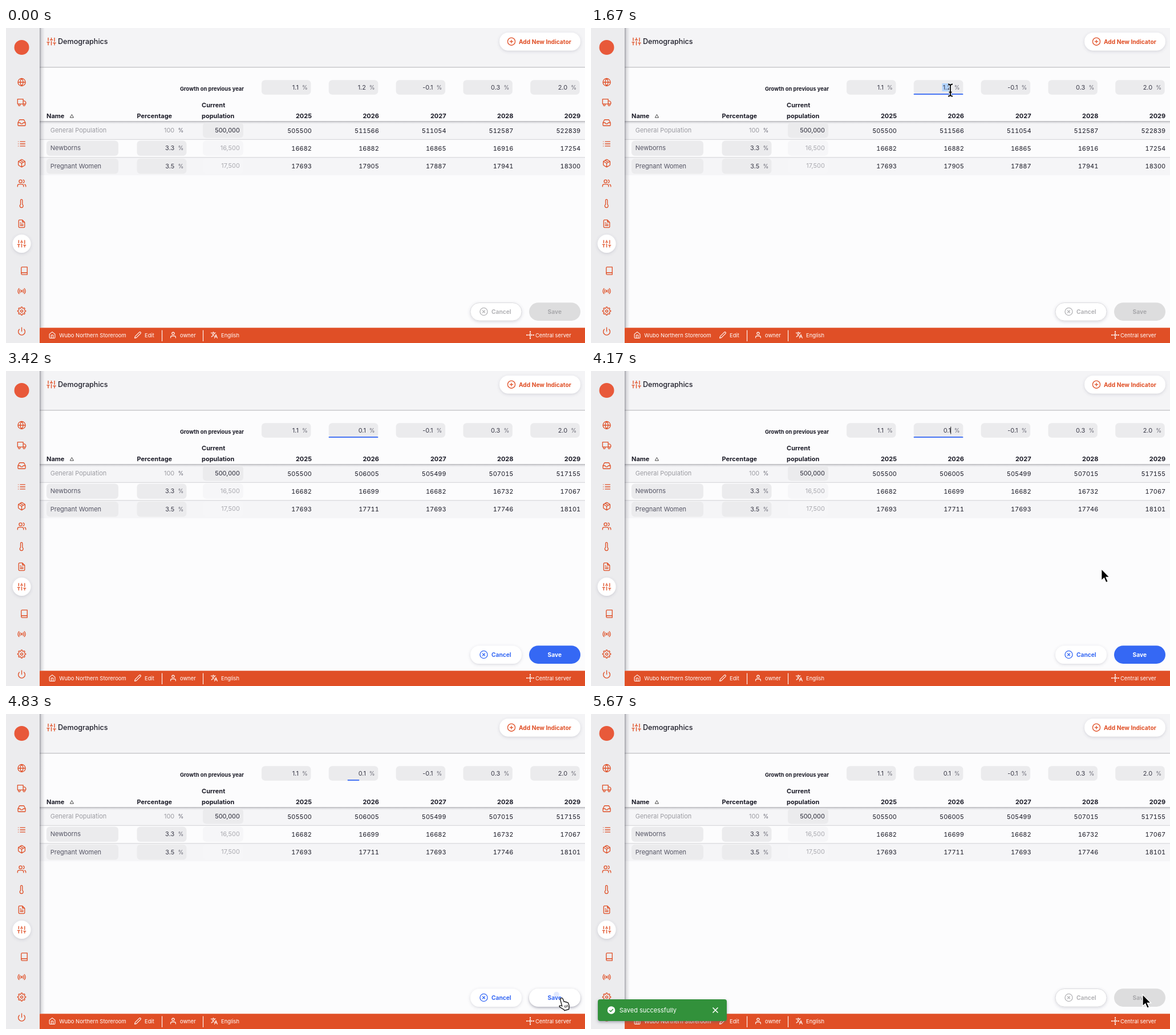
Write an HTML page that moves like this. It is 1015x552 px and loops after 5750 ms.

```html
<!DOCTYPE html>
<html lang="en">
<head>
<meta charset="utf-8">
<title>Demographics</title>
<style>
html, body { margin: 0; width: 100%; height: 100%; overflow: hidden; background: #fcfcfd; }
svg { display: block; width: 1015px; height: 552px; font-family: Inter, sans-serif; font-size: 11px; }
.b { font-weight: 700; }
.tab { font-variant-numeric: tabular-nums; }
</style>
</head>
<body>
<svg id="stage" viewBox="0 0 1015 552" xmlns="http://www.w3.org/2000/svg"></svg>
<script>
const LOOP = 5750;
const ORANGE = '#e04f26', BOX = '#ebebed', INK = '#1c1c28';
const YEARS = [2025, 2026, 2027, 2028, 2029];
const GROWTH = [1.1, 1.2, -0.1, 0.3, 2];
const STEP = 117.8;

// ---- markup helpers
const ring = (x, y, r) => `M${x - r} ${y}a${r} ${r} 0 1 0 ${2 * r} 0a${r} ${r} 0 1 0 ${-2 * r} 0`;
const rect = (x, y, w, h, fill, r = 0, extra = '') =>
  `<rect x="${x}" y="${y}" width="${w}" height="${h}" rx="${r}" fill="${fill}" ${extra}/>`;
const text = (x, y, s, o = {}) =>
  `<text x="${x}" y="${y}" fill="${o.fill || INK}" font-size="${o.size || 11}" font-weight="${o.weight || 400}"
    text-anchor="${o.end ? 'end' : o.mid ? 'middle' : 'start'}" ${o.attr || ''}>${s}</text>`;
const icon = (name, x, y, o = {}) => {
  const k = (o.size || 15.7) / 24;
  return `<path d="${ICONS[name]}" transform="translate(${x} ${y}) scale(${k}) translate(-12 -12)" fill="none"
    stroke="${o.color || ORANGE}" stroke-width="2" stroke-linecap="round" stroke-linejoin="round" ${o.attr || ''}/>`;
};

function gear() {
  let d = ring(12, 12, 3);
  for (let i = 0; i <= 96; i++) {
    const a = i / 96 * Math.PI * 2;
    const r = 9.4 + 1.6 * Math.tanh(2 * Math.cos(8 * a));
    d += (i ? 'L' : 'M') + (12 + r * Math.cos(a)).toFixed(2) + ' ' + (12 + r * Math.sin(a)).toFixed(2);
  }
  return d + 'z';
}

const ICONS = {
  globe: ring(12, 12, 10) + 'M2 12h20M12 2a15.3 15.3 0 0 1 4 10 15.3 15.3 0 0 1-4 10 15.3 15.3 0 0 1-4-10 15.3 15.3 0 0 1 4-10z',
  truck: 'M1 3h15v13H1zM16 8h4l3 3v5h-7z' + ring(5.5, 18.5, 2.5) + ring(18.5, 18.5, 2.5),
  inbox: 'M22 12h-6l-2 3h-4l-2-3H2M5.45 5.11L2 12v6a2 2 0 0 0 2 2h16a2 2 0 0 0 2-2v-6l-3.45-6.89A2 2 0 0 0 16.76 4H7.24a2 2 0 0 0-1.79 1.11z',
  list: 'M8 6h13M8 12h13M8 18h13M3 6h.01M3 12h.01M3 18h.01',
  box: 'M16.5 9.4l-9-5.19M21 16V8a2 2 0 0 0-1-1.73l-7-4a2 2 0 0 0-2 0l-7 4A2 2 0 0 0 3 8v8a2 2 0 0 0 1 1.73l7 4a2 2 0 0 0 2 0l7-4A2 2 0 0 0 21 16zM3.27 6.96L12 12.01l8.73-5.05M12 22.08V12',
  users: 'M17 21v-2a4 4 0 0 0-4-4H5a4 4 0 0 0-4 4v2M23 21v-2a4 4 0 0 0-3-3.87M16 3.13a4 4 0 0 1 0 7.75' + ring(9, 7, 4),
  thermo: 'M14 14.76V3.5a2.5 2.5 0 0 0-5 0v11.26a4.5 4.5 0 1 0 5 0z',
  file: 'M14 2H6a2 2 0 0 0-2 2v16a2 2 0 0 0 2 2h12a2 2 0 0 0 2-2V8zM14 2v6h6M16 13H8M16 17H8M10 9H8',
  sliders: 'M4 21v-7M4 10V3M12 21v-9M12 8V3M20 21v-5M20 12V3M1 14h6M9 8h6M17 16h6',
  book: 'M4 19.5A2.5 2.5 0 0 1 6.5 17H20M6.5 2H20v20H6.5A2.5 2.5 0 0 1 4 19.5v-15A2.5 2.5 0 0 1 6.5 2z',
  radio: ring(12, 12, 2) + 'M16.24 7.76a6 6 0 0 1 0 8.49m-8.48-.01a6 6 0 0 1 0-8.49m11.31-2.82a10 10 0 0 1 0 14.14m-14.14 0a10 10 0 0 1 0-14.14',
  gear: gear(),
  power: 'M18.36 6.64a9 9 0 1 1-12.73 0M12 2v10',
  plus: ring(12, 12, 10) + 'M12 8v8M8 12h8',
  cross: ring(12, 12, 10) + 'M15 9l-6 6M9 9l6 6',
  home: 'M3 9l9-7 9 7v11a2 2 0 0 1-2 2H5a2 2 0 0 1-2-2zM9 22V12h6v10',
  pen: 'M17 3a2.83 2.83 0 1 1 4 4L7.5 20.5 2 22l1.5-5.5z',
  user: 'M20 21v-2a4 4 0 0 0-4-4H8a4 4 0 0 0-4 4v2' + ring(12, 7, 4),
  hub: 'M12 8.5L15.5 12 12 15.5 8.5 12zM12 7V4M12 17v3M7 12H4M17 12h3' +
    ring(12, 1.5, 1) + ring(12, 22.5, 1) + ring(1.5, 12, 1) + ring(22.5, 12, 1),
  lang: 'M1.5 5h15M9 2v3M13 5c-1 4-4.500 9-10 13M5.500 8c1.500 3.500 4 6 7 8M13 22l4.500-11.500L22 22M14.800 18h5.500',
};

// ---- static layers
function defs() {
  const shadow = (id, dy, blur, op) => `<filter id="${id}" x="-30%" y="-60%" width="160%" height="240%">
    <feDropShadow dx="0" dy="${dy}" stdDeviation="${blur}" flood-color="#555770" flood-opacity="${op}"/></filter>`;
  return `<defs>${shadow('soft', 1.5, 2.5, .22)}${shadow('deep', 2, 2.5, .5)}
    <linearGradient id="edge"><stop offset="0" stop-color="#444450" stop-opacity=".5"/>
      <stop offset=".35" stop-color="#555560" stop-opacity=".17"/><stop offset="1" stop-color="#555560" stop-opacity="0"/></linearGradient>
    <linearGradient id="fall" x2="0" y2="1"><stop stop-color="#555560" stop-opacity=".22"/>
      <stop offset="1" stop-color="#555560" stop-opacity="0"/></linearGradient>
    <clipPath id="saveClip"><rect x="917" y="481" width="90" height="32" rx="16"/></clipPath></defs>`;
}

function sidebar() {
  const items = [['globe', 95], ['truck', 130.500], ['inbox', 166], ['list', 203], ['box', 237], ['users', 272],
    ['thermo', 307.500], ['file', 343], ['sliders', 378], ['book', 425.500], ['radio', 461], ['gear', 496], ['power', 531.500]];
  return rect(0, 0, 59, 552, '#ececee') + rect(59, 0, 9, 525, 'url(#edge)') +
    `<circle cx="27.500" cy="34" r="13" fill="#e8593a"/>
     <circle cx="27.500" cy="378" r="16" fill="#fff" filter="url(#soft)"/>` +
    items.map(([n, y]) => icon(n, n === 'book' ? 32 : 27.5, y)).join('');
}

function header() {
  return rect(59, 0, 956, 69, '#f4f4f6') + rect(59, 68.3, 956, 1.1, '#b9b9bc') +
    icon('sliders', 79.5, 23.5, { size: 16.5 }) + text(91, 27.7, 'Demographics', { size: 12.6, weight: 500 }) +
    rect(865, 8, 142, 31.5, '#fff', 15.75, 'filter="url(#soft)"') + icon('plus', 886, 23.7) +
    text(899, 27.5, 'Add New Indicator', { size: 10.2, weight: 700, fill: ORANGE });
}

function table() {
  const bold = { weight: 700 }, grey = '#9c9ca2', slate = '#555564';
  let s = rect(59, 164, 956, 31, '#f5f5f7') + rect(59, 227, 956, 31, '#f5f5f7') +
    rect(59, 194.8, 956, 1, '#d2d2d5') + rect(59, 226.3, 956, 1, '#d2d2d5') +
    rect(59, 163, 956, 1.2, '#bdbdc0') + rect(59, 164, 956, 4, 'url(#fall)');
  s += text(305, 110, 'Growth on previous year', { size: 9.4, weight: 700 }) +
    text(71, 158, 'Name', bold) + text(229.5, 158, 'Percentage', bold) +
    text(343, 139, 'Current', bold) + text(343, 158, 'population', bold) +
    '<path d="M112.300 157h6.200l-3.100-5.500z" fill="none" stroke="#333" stroke-width=".9"/>';
  YEARS.forEach((y, i) => {
    const x = i * STEP;
    s += text(536 + x, 158, y, { weight: 700, end: 1 }) + rect(448 + x, 91.3, 86.500, 25.400, BOX, 6) +
      text(519 + x, 107.500, '%', { size: 10, fill: '#666672' });
    if (i !== 1) s += text(513 + x, 107.800, GROWTH[i].toFixed(1), { end: 1, fill: '#3a3a48' });
  });
  [['General Population', '100', '500,000'], ['Newborns', '3.3', '16,500'], ['Pregnant Women', '3.5', '17,500']]
    .forEach(([name, pct, pop], i) => {
      const y = i * 31.4, top = i === 0;
      if (!top) s += rect(71, 166 + y, 126, 26.6, BOX, 6) + rect(229.5, 166 + y, 87, 26.6, BOX, 6);
      s += rect(345, 165.8 + y, 71, 26.6, top ? BOX : '#f6f6f8', 6) +
        text(77.7, 182.8 + y, name, { fill: top ? grey : slate }) +
        text(295.3, 182.8 + y, pct, { end: 1, fill: top ? grey : '#3a3a48' }) +
        text(301.5, 183 + y, '%', { size: 10, fill: '#666672' }) +
        text(410, 182.6 + y, pop, { end: 1, fill: top ? '#2b2b38' : '#aaaab0' });
      YEARS.forEach((_, c) => {
        s += text(536 + c * STEP, 183.6 + y, '', { end: 1, attr: `class="tab" id="v${i}${c}"` });
      });
    });
  return s;
}

function footer() {
  const o = { size: 9.4, fill: '#fff' }, w = { size: 13, color: '#fff' };
  return rect(59, 525.3, 956, 27, ORANGE) +
    icon('home', 81, 538, w) + text(93.3, 542.4, 'Wubo Northern Storeroom', o) +
    icon('pen', 231, 538, w) + text(243, 542.4, 'Edit', o) +
    rect(273, 529.5, 1.1, 19.5, '#fff') + icon('user', 293, 538, w) + text(305, 542.4, 'owner', o) +
    rect(345, 529.5, 1.1, 19.5, '#fff') + icon('lang', 365, 538, w) + text(377, 542.4, 'English', o) +
    icon('hub', 919, 538, { size: 13.5, color: '#fff' }) + text(928, 542.4, 'Central server', o);
}

function field() {
  return '<rect id="sel" x="615.500" y="97" width="16" height="14" fill="#b3d4fd"/>' +
    text(631, 107.800, '', { end: 1, fill: '#3a3a48', attr: 'id="typed"' }) +
    rect(630.2, 97.5, 1, 13, '#222', 0, 'id="caret"') +
    rect(565.8, 115.4, 86.5, 1.2, '#55555f', 0, 'id="hover"') +
    '<rect id="focus" y="115" height="1.800" fill="#3568f4"/>';
}

function buttons() {
  const o = { size: 10.2, weight: 700 };
  return rect(814, 481.5, 90, 31.5, '#fff', 15.75, 'id="cancelBox" filter="url(#soft)"') +
    `<g id="cancelInk">${icon('cross', 837.5, 497, { color: 'inherit' })}` +
    text(851, 500.800, 'Cancel', { ...o, fill: 'inherit' }) + '</g>' +
    rect(917, 481.3, 90, 31.7, '#ddd', 15.85, 'id="saveBox"') +
    '<circle id="ripple" cx="965" cy="491.500" fill="#3568f4" clip-path="url(#saveClip)"/>' +
    text(961.8, 500.800, 'Save', { ...o, mid: 1, attr: 'id="saveInk"' });
}

function toast() {
  return `<g id="toast">${rect(0, 500, 226, 38, '#33913b', 4, 'filter="url(#deep)"')}
    <circle cx="23.500" cy="519" r="6.800" fill="#fff"/>
    <path d="M20.300 519.200l2.300 2.300 4.200-4.400" fill="none" stroke="#33913b" stroke-width="1.500"/>
    ${text(37.7, 523, 'Saved successfully', { fill: '#fff' })}
    <path d="M201.500 514.500l9 9m0-9l-9 9" stroke="#fff" stroke-width="1.600"/></g>`;
}

function cursors() {
  return `<path id="arrow" d="M0 0V20.500L4.700 16.200 8 23.800 11.500 22.300 8.200 14.800H14.500z" fill="#000" stroke="#fff" stroke-width="1.300"/>
    <g id="beam" fill="none"><path d="M-4-10.500Q0-10.500 0-7.500Q0-10.500 4-10.500M0-8V8M-4 10.500Q0 10.500 0 7.500Q0 10.500 4 10.500M-2.500 3.500h5" stroke="#fff" stroke-width="3.600"/>
      <path d="M-4-10.500Q0-10.500 0-7.500Q0-10.500 4-10.500M0-8V8M-4 10.500Q0 10.500 0 7.500Q0 10.500 4 10.500M-2.500 3.500h5" stroke="#000" stroke-width="1.800"/></g>
    <g id="hand"><path transform="translate(1.500 5.500)" d="M4.800.8c1.400-.5 2.400.1 2.900 1.400l2 5c1-.6 2.100-.3 2.500.6 1-.5 2.100-.1 2.500.8 1.200-.4 2.200.1 2.600 1.200l1.300 3.800c.6 2 .2 3.200-.2 4.400l-.2 2.400-7.600 2.300-1.200-1.900c-2.300-.8-4.600-2.600-7.200-4.400-1.500-1.200 0-3 1.800-2.400l2.200.7L3.300 3.800C2.800 2.400 3.500 1.200 4.800.8z" fill="#fff" stroke="#111" stroke-width="1.300"/>
      <path transform="translate(1.500 5.500)" d="M10.800 14l1.200 4M13.200 13.300l1.200 4M15.500 12.500l1.200 4" stroke="#111"/></g>`;
}

document.getElementById('stage').innerHTML =
  defs() + header() + table() + field() + buttons() + footer() + sidebar() + toast() + cursors();

// ---- motion
const el = {};
document.querySelectorAll('[id]').forEach(n => { el[n.id] = n; });
const set = (id, o) => { for (const k in o) el[id].setAttribute(k, o[k]); };
const show = (id, on) => set(id, { display: on ? 'inline' : 'none' });
const span = (t, a, d) => Math.min(1, Math.max(0, (t - a) / d));
const smooth = u => u * u * (3 - 2 * u);
const out = (u, p = 3) => 1 - Math.pow(1 - u, p);
const lerp = (a, b, u) => a + (b - a) * u;
const mix = (a, b, u) => a.map((v, i) => lerp(v, b[i], u));
const rgb = c => `rgb(${c.map(Math.round)})`;
const GREY = [221, 221, 222], MUTE = [168, 168, 171], BLUE = [53, 104, 244], WHITE = [255, 255, 255];

function values(g2026) {
  const rates = GROWTH.slice();
  rates[1] = g2026;
  [500000, 16500, 17500].forEach((v, row) => rates.forEach((g, c) => {
    v = Math.round(v * (1 + g / 100));
    el['v' + row + c].textContent = v;
  }));
}

function pointer(t) {
  if (t < 1000) {
    const u = span(t, 300, 700);
    return [lerp(720, 632, out(u, 2)), lerp(560, 119, out(u, 2))];
  }
  if (t < 3850) {
    const u = smooth(span(t, 1000, 180));
    return [lerp(632, 630, u), lerp(119, 109, u)];
  }
  const u = span(t, 3850, 700);
  return [lerp(632, 967, out(u, 2.5)), lerp(119, 491.5, out(u, 1.54))];
}

function draw(t) {
  const typed = t < 2380 ? '1.2' : t < 2670 ? '0' : t < 2910 ? '0.' : '0.1';
  el.typed.textContent = typed;
  values(t < 2380 ? 1.2 : t < 3000 ? 0 : 0.1);

  const since = t < 2380 ? t - 1350 : t < 2670 ? t - 2380 : t < 2910 ? t - 2670 : t - 2910;
  const selected = t >= 1550 && t < 2380;
  show('sel', selected);
  show('caret', t >= 1350 && t < 4760 && !selected && since % 1000 < 500);

  const [x, y] = pointer(t);
  const overField = t >= 900 && t < 3880 && y < 124;
  show('hover', overField && t < 1350);
  const w = 86.5 * (out(span(t, 1350, 200), 3.3) - out(span(t, 4760, 200), 3.3));
  set('focus', { x: 609 - w / 2, width: Math.max(0, w) });

  const active = t >= 2340 && t < 5080;
  const on = smooth(span(t, 2340, 150)), over = smooth(span(t, 4400, 200)), off = smooth(span(t, 5080, 150));
  const fill = mix(mix(mix(GREY, BLUE, on), WHITE, over), GREY, off);
  const ink = mix(mix(mix(MUTE, WHITE, on), BLUE, over), MUTE, off);
  set('saveBox', { fill: rgb(fill), filter: over > 0.3 && active ? 'url(#deep)' : 'none' });
  set('saveInk', { fill: rgb(ink) });
  const cancel = rgb(active ? BLUE : [180, 180, 183]);
  set('cancelInk', { fill: cancel });
  el.cancelInk.querySelector('path').setAttribute('stroke', cancel);
  set('cancelBox', { stroke: active ? 'none' : '#dcdcdf' });

  show('ripple', t >= 4810 && t < 5150);
  set('ripple', { r: Math.max(0, (t - 4810) * 0.23), opacity: 0.14 * (1 - span(t, 4950, 200)) });

  show('toast', t >= 5080);
  set('toast', { transform: `translate(${lerp(-240, 12, out(span(t, 5080, 225)))} 0)` });

  const visible = (t >= 300 && t < 2380) || t >= 3800;
  const kind = overField ? 'beam' : t >= 4400 && t < 5080 ? 'hand' : 'arrow';
  ['arrow', 'beam', 'hand'].forEach(k => {
    show(k, visible && k === kind);
    set(k, { transform: `translate(${x} ${y})` });
  });
}

function tick() {
  draw(performance.now() % LOOP);
  requestAnimationFrame(tick);
}
tick();
</script>
</body>
</html>
```
